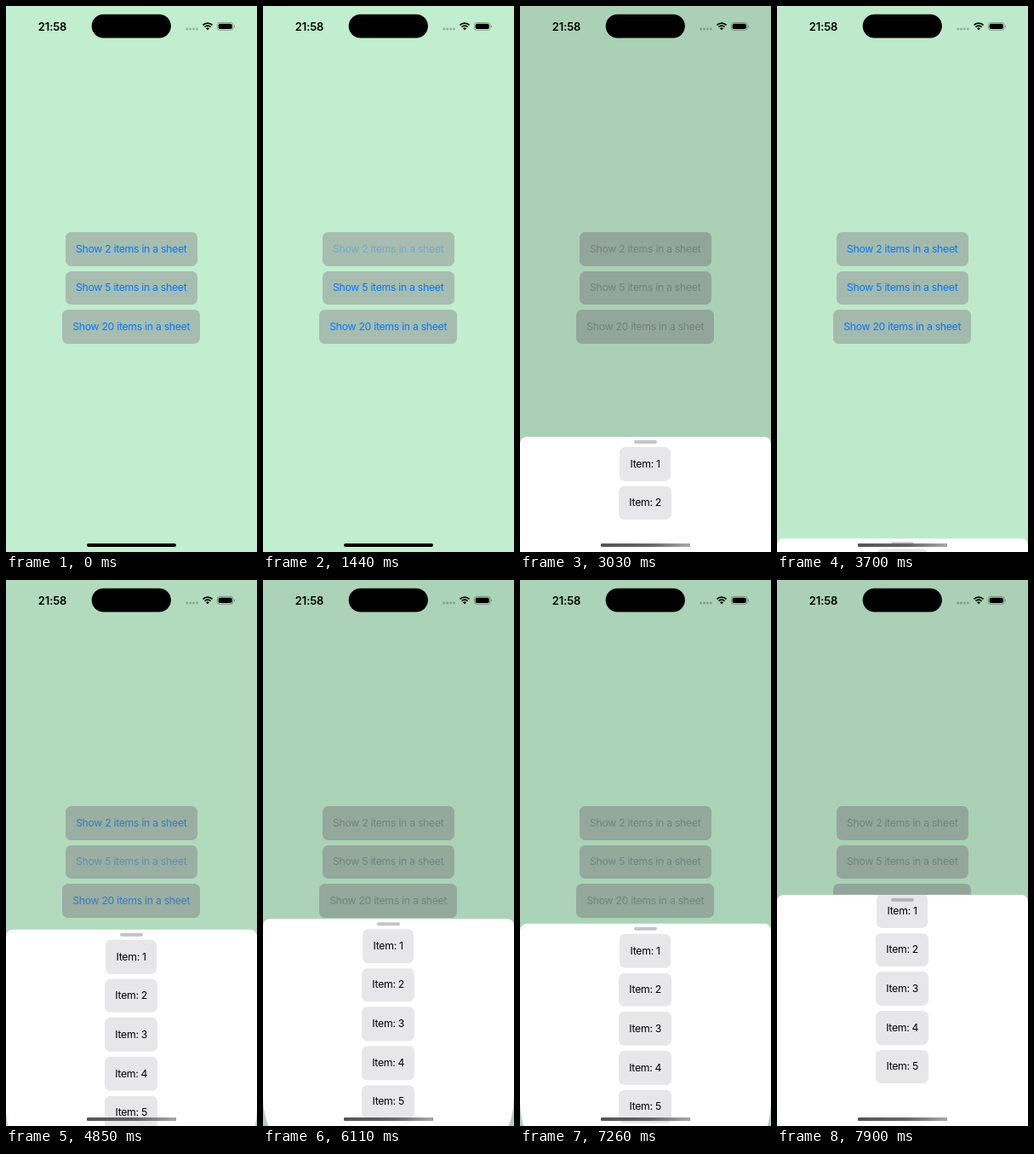
Animation of 295 by 640 pixels, one loop 8 s. Source, as an HTML page:

```html
<!DOCTYPE html>
<html lang="en">
<head>
<meta charset="utf-8">
<title>Item sheet</title>
<style>
  html, body { margin: 0; width: 100%; height: 100%; overflow: hidden; }
  body { font: 12.25px/1 Inter, "Noto Sans", sans-serif; letter-spacing: -.29px; }
  .stage { position: relative; width: 295px; height: 640px; overflow: hidden; background: #c1eece; }
  .stage div, svg { position: absolute; box-sizing: border-box; }
  .fill { inset: 0; }
  .btn, .item {
    display: flex; align-items: center; justify-content: center;
    height: 39.6px; border-radius: 6.5px; white-space: nowrap;
  }
  .btn { background: rgba(142, 142, 147, .5); }
  .item { background: #e7e7ea; color: #000; }
  #dim { background: #000; opacity: 0; }
  #sheet { left: 0; width: 295px; top: 0; background: #fff; overflow: hidden; }
  #list { left: 0; top: 12px; width: 295px; }
  .grabber { left: 134px; top: 4px; width: 26.5px; height: 3.8px; border-radius: 2px; background: rgba(60, 60, 67, .3); }
  .time { left: 34px; top: 17.5px; width: 41px; text-align: center; font-size: 13px; font-weight: 600; letter-spacing: -.1px; }
  .home { left: 95px; top: 630px; width: 105px; height: 4px; border-radius: 2px; background: #000; }
  #soft { background: linear-gradient(90deg, #555, #666 55%, #aaa); }
</style>
</head>
<body>
<div class="stage">
  <div id="menu" class="fill"></div>
  <div id="dim" class="fill"></div>
  <div id="sheet">
    <div id="list"></div>
    <div class="grabber"></div>
  </div>
  <div class="time">21:58</div>
  <svg width="295" height="48" viewBox="0 0 295 48">
    <rect x="100.7" y="9.7" width="93.2" height="27.8" rx="13.9"/>
    <g fill="#000" fill-opacity=".25">
      <circle cx="212.7" cy="27" r="1.4"/><circle cx="216.6" cy="27" r="1.4"/>
      <circle cx="220.5" cy="27" r="1.4"/><circle cx="224.4" cy="27" r="1.4"/>
    </g>
    <g fill="none" stroke="#000" stroke-width="1.8">
      <path d="M231.4 22.4a8 8 0 0 1 11.2 0"/>
      <path d="M233.5 24.7a5 5 0 0 1 7 0"/>
    </g>
    <path d="M237 28.3l-2-2.1a2.9 2.9 0 0 1 4 0z"/>
    <rect x="248.4" y="19.4" width="18.6" height="9" rx="2.9" fill="none" stroke="#000" stroke-opacity=".4" stroke-width=".8"/>
    <rect x="249.7" y="20.7" width="16" height="6.4" rx="1.8"/>
    <path d="M268.1 22.4v3a1.7 1.7 0 0 0 0-3z" fill-opacity=".45"/>
  </svg>
  <div class="home"></div>
  <div id="soft" class="home"></div>
</div>
<script>
const LOOP = 8000, STEP = 110, FADE = 330, PITCH = 45.65, HIDDEN = 644;
const $ = id => document.getElementById(id);

// Each phase runs from its start to its end.
const openTwo = [1440, 2200], close = [3030, 3820], openFive = [4640, 5300];
const shortDrag = [5680, 6410], longDrag = [6610, 7360], scrollUp = [7460, 7900];
const phases = [openTwo, close, openFive, shortDrag, longDrag, scrollUp];

const clamp = x => Math.max(0, Math.min(1, x));
const part = (t, [start, end]) => clamp((t - start) / (end - start));
const bump = (t, phase) => Math.sin(Math.PI * part(t, phase));
const smooth = p => p * p * (3 - 2 * p);
const mix = (a, b, p) => a + (b - a) * p;
const fadeIn = (t, [start]) => clamp((t - start) / FADE);

// Critically damped spring from 0 to 1.
function spring(t, start) {
  const x = Math.max(0, t - start) / 65;
  return 1 - (1 + x) * Math.exp(-x);
}

// Hold the picture between steps, as a low frame rate recording does.
function snap(t) {
  const [start, end] = phases.findLast(p => t >= p[0]) || [0, STEP];
  const steps = Math.round((end - start) / STEP), gap = (end - start) / steps;
  return start + gap * Math.min(steps, Math.floor((t - start) / gap + .12));
}

function box(parent, cls, label, y, w) {
  const el = document.createElement("div"), text = document.createElement("span");
  el.className = cls;
  el.style.cssText = `left:${147.2 - w / 2}px;top:${y}px;width:${w}px`;
  text.textContent = label;
  el.append(text);
  parent.append(el);
  return el;
}

const labels = [2, 5, 20].map((n, i) =>
  box($("menu"), "btn", `Show ${n} items in a sheet`, 265 + i * PITCH, n > 9 ? 162.4 : 155).firstChild);
const items = [1, 2, 3, 4, 5].map((n, i) =>
  box($("list"), "item", `Item: ${n}`, i * PITCH, n > 1 ? 62 : 60));

const blue = [0, 122, 255], gray = [131, 148, 143];

function pressed(t, phase) {
  return t < phase[0] ? 1 : mix(.3, 1, fadeIn(t, phase) ** 2);
}

function draw(time) {
  const t = snap(time), two = t < openFive[0];
  const count = two ? 2 : 5, rest = two ? 505 : 369;
  const gone = two ? part(t, close) : 0;
  const shown = two ? spring(t, openTwo[0] + 200) : spring(t, openFive[0]);
  const drag = 29 * bump(t, shortDrag) + 78 * bump(t, longDrag);
  const top = mix(HIDDEN, rest, shown * (1 - gone)) + drag;
  const fade = fadeIn(t, two ? openTwo : openFive) * (1 - gone);

  const sheet = $("sheet").style, corner = Math.min(41, (top - rest) * 1.5);
  sheet.height = 640 - rest + "px";
  sheet.transform = `translateY(${top}px)`;
  sheet.borderRadius = `8px 8px ${corner}px ${corner}px / 8px 8px ${corner * 1.5}px ${corner * 1.5}px`;
  $("list").style.transform = `translateY(${-13 * smooth(part(t, scrollUp))}px)`;
  items.forEach((el, i) => el.style.visibility = i < count ? "visible" : "hidden");

  const color = `rgb(${blue.map((c, i) => Math.round(mix(c, gray[i], fade ** 2)))})`;
  const opacity = [pressed(t, openTwo), pressed(t, openFive), 1];
  labels.forEach((el, i) => {
    el.style.color = color;
    el.style.opacity = opacity[i];
  });

  const swell = bump(t, openTwo);
  $("menu").style.transform = swell > .01 ? `translateY(${-2 * swell}px) scale(${1 + .009 * swell})` : "none";
  $("dim").style.opacity = .12 * fade - .0002 * drag;
  $("soft").style.visibility = top < 631 ? "visible" : "hidden";
}

const begin = performance.now();
function tick() {
  draw((performance.now() - begin) % LOOP);
  requestAnimationFrame(tick);
}
tick();
</script>
</body>
</html>
```
